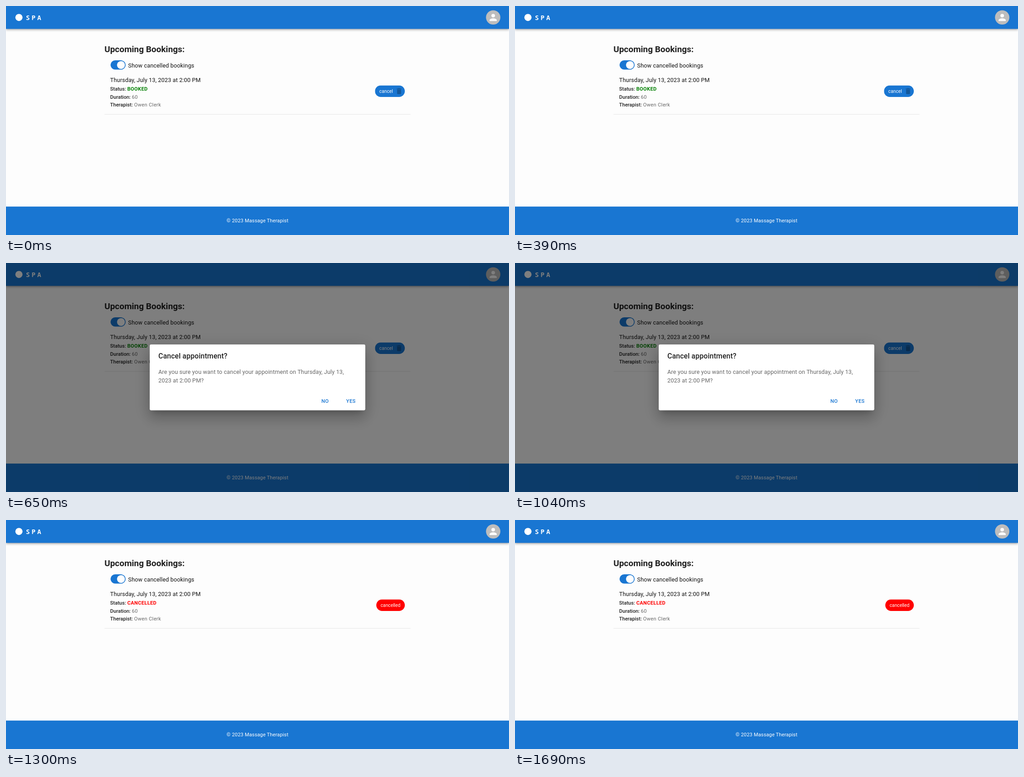
An HTML page for the animation above (1950 ms loop, 1106 by 506 pixels).

```html
<!DOCTYPE html>
<html lang="en">
<head>
<meta charset="utf-8">
<title>Upcoming Bookings</title>
<style>
  html, body { margin: 0; width: 100%; height: 100%; overflow: hidden; background: #fdfdfd; }
  /* The interface is laid out 1400 units wide and scaled to the stage. */
  .stage { position: absolute; left: 0; top: 0; width: 1400px; height: 640.51px; overflow: hidden;
    transform: scale(.79); transform-origin: 0 0; background: #fdfdfd; }
  .stage > * { position: absolute; }
  .layer, .shade { left: 0; top: 0; width: 1400px; height: 640.51px; }
  .bar { left: 0; top: 0; width: 1400px; height: 64px; background: #1976d2;
    box-shadow: 0 2px 4px -1px rgba(0,0,0,.2), 0 4px 5px rgba(0,0,0,.14), 0 1px 10px rgba(0,0,0,.12); }
  .footer { left: 0; top: 560.5px; width: 1400px; height: 81px; background: #1976d2; }
  .shade { background: rgba(0,0,0,.5); }
  .dialog { position: absolute; left: 400px; top: 228.25px; width: 600px; height: 184px; border-radius: 4px; background: #fff;
    box-shadow: 0 11px 15px -7px rgba(0,0,0,.2), 0 24px 38px 3px rgba(0,0,0,.14), 0 9px 46px 8px rgba(0,0,0,.12); }
  .shade svg { position: absolute; }
  text { font: 400 16px Roboto, sans-serif; letter-spacing: .15px; fill: #111; white-space: pre; }
  .heading { font-size: 24px; font-weight: 700; letter-spacing: 0; fill: #212121; }
  .brand { font: 700 18px "Noto Sans Mono", monospace; letter-spacing: 5px; fill: #fff; }
  .field { font-size: 14px; font-weight: 500; letter-spacing: 0; fill: #212121; }
  .value { font-weight: 400; letter-spacing: .45px; fill: #666; }
  .status { font-weight: 700; letter-spacing: .45px; }
  .chip { font-size: 13px; letter-spacing: 0; fill: #fff; }
  .copyright { font-size: 14px; fill: #fff; text-anchor: middle; }
  .title { font-size: 20px; font-weight: 500; fill: #212121; }
  .question { fill: #666; }
  .action { font-size: 14px; font-weight: 500; letter-spacing: .4px; fill: #1976d2; text-anchor: middle; }
</style>
</head>
<body>
<div class="stage">
  <div class="bar"></div>
  <div class="footer"></div>

  <svg class="layer" viewBox="0 0 1400 640.51">
    <circle cx="36" cy="32" r="10" fill="#fff"/>
    <text class="brand" x="55.4" y="39">SPA</text>
    <circle cx="1356" cy="32" r="20" fill="#bdbdbd"/>
    <g transform="translate(1341 17) scale(1.25)" fill="#fdfdfd">
      <circle cx="12" cy="8" r="4"/>
      <path d="M12 14c-2.67 0-8 1.34-8 4v2h16v-2c0-2.66-5.33-4-8-4z"/>
    </g>

    <text class="heading" x="274" y="129.3">Upcoming Bookings:</text>
    <rect x="291" y="152" width="42" height="26" rx="13" fill="#1976d2"/>
    <circle cx="320" cy="165" r="11" fill="#fdfdfd"/>
    <text x="340" y="172.2">Show cancelled bookings</text>

    <text x="290" y="213">Thursday, July 13, 2023 at 2:00 PM</text>
    <text class="field" x="290" y="236.5">Status: <tspan class="status" fill="green" data-steps="0 1">BOOKED</tspan></text>
    <text class="field" x="290" y="259.3">Duration: <tspan class="value">60</tspan></text>
    <text class="field" x="290" y="281.5">Therapist: <tspan class="value">Owen Clerk</tspan></text>
    <rect x="274" y="302.4" width="852" height="1" fill="#000" fill-opacity=".12"/>

    <g data-steps="0 1">
      <rect x="1027" y="222.3" width="83" height="32" rx="16" fill="#1976d2"/>
      <text class="chip" x="1039" y="243">cancel</text>
      <path transform="translate(1083 227.3) scale(.9167)" fill="#000" fill-opacity=".26"
        d="M6 19c0 1.1.9 2 2 2h8c1.1 0 2-.9 2-2V7H6v12zM19 4h-3.5l-1-1h-5l-1 1H5v2h14V4z"/>
    </g>
    <g data-steps="2">
      <rect x="1030.7" y="222.3" width="79.3" height="32" rx="16" fill="#f00"/>
      <text class="chip" x="1042.7" y="243">cancelled</text>
    </g>

    <text class="copyright" x="700" y="604.8">© 2023 Massage Therapist</text>
  </svg>

  <div class="shade" data-steps="1">
    <div class="dialog"></div>
    <svg class="layer" viewBox="0 0 1400 640.51">
      <text class="title" x="424" y="267.2">Cancel appointment?</text>
      <text class="question" x="424" y="309.6">Are you sure you want to cancel your appointment on Thursday, July 13,</text>
      <text class="question" x="424" y="333.6">2023 at 2:00 PM?</text>
      <text class="action" x="888" y="391.3">NO</text>
      <text class="action" x="960" y="391.3">YES</text>
    </svg>
  </div>
</div>

<script>
  const STEP_MS = 650, STEPS = 3;

  // The status word swaps as text so that it keeps flowing after its label.
  const status = document.querySelector('.status');
  status.removeAttribute('data-steps');
  const statusByStep = [['BOOKED', 'green'], ['BOOKED', 'green'], ['CANCELLED', '#f00']];

  for (const el of document.querySelectorAll('[data-steps]')) {
    const shown = el.dataset.steps.split(' ').map(Number);
    const frames = [0, 1, 2, 2].map((step, i) => ({
      opacity: shown.includes(step) ? 1 : 0, offset: i / STEPS, easing: 'step-end'
    }));
    el.animate(frames, { duration: STEP_MS * STEPS, iterations: Infinity }).startTime = 0;
  }

  function draw() {
    const now = document.timeline.currentTime || 0;
    const [word, color] = statusByStep[Math.floor(now / STEP_MS) % STEPS];
    if (status.textContent !== word) {
      status.textContent = word;
      status.setAttribute('fill', color);
    }
    requestAnimationFrame(draw);
  }
  draw();
</script>
</body>
</html>
```
